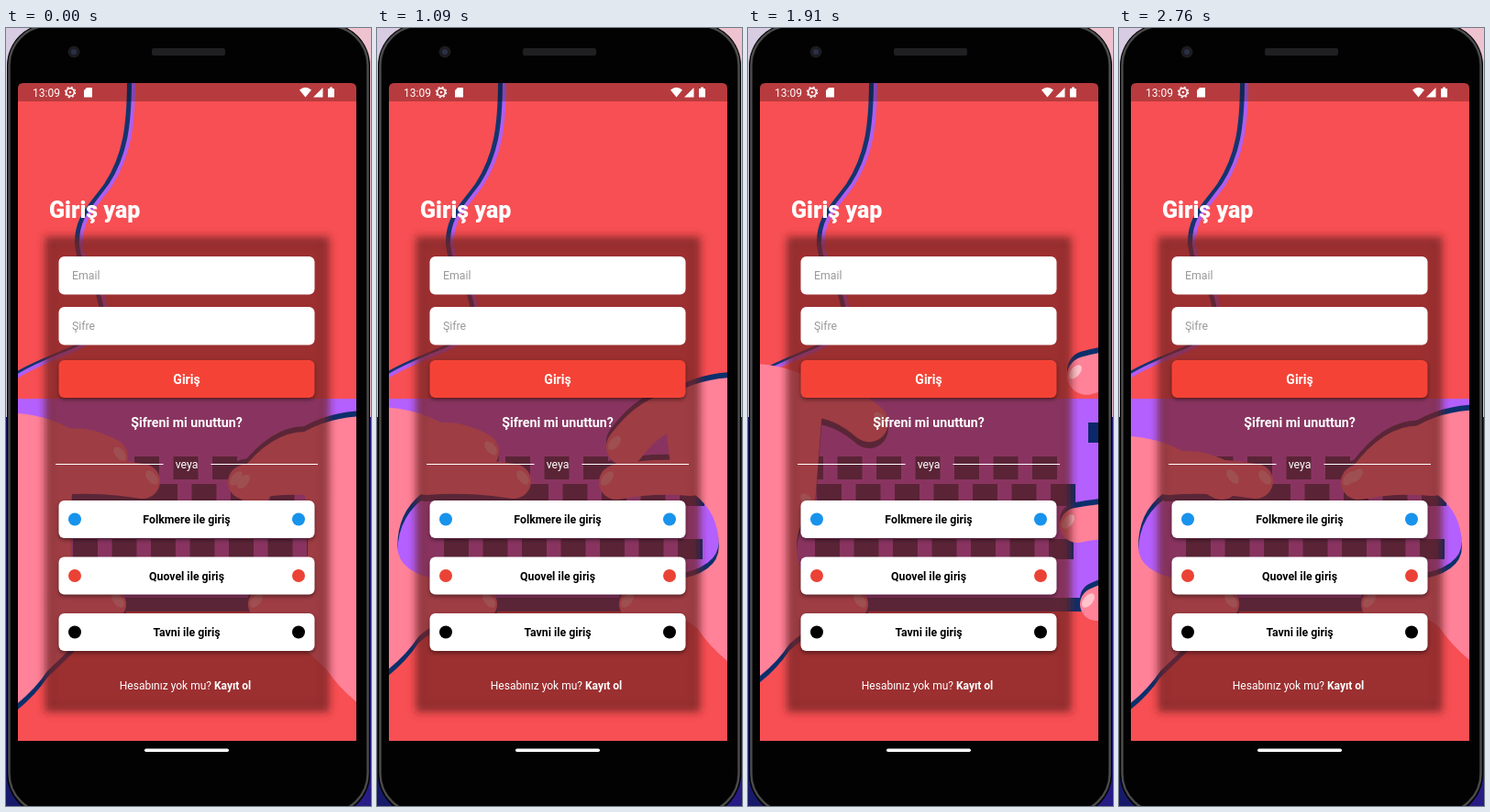
Recreate the animation shown at these times as an HTML page. Size 398x848 px, loop 2.79 s.

```html
<!DOCTYPE html>
<html lang="tr">
<head>
<meta charset="utf-8">
<title>Giriş</title>
<style>
  html, body { margin: 0; width: 100%; height: 100%; overflow: hidden; background: #000; }
  svg { display: block; width: 100%; height: 100%; }
  text { font-family: Roboto, sans-serif; font-size: 12.3px; fill: #fff; }
  .bold { font-weight: 700; }
  .mid { text-anchor: middle; }
  .hint { fill: #999; }
  .raised { filter: drop-shadow(0 2px 2px rgba(0, 0, 0, .45)); }
  .skin { color: #ff8299; }
  .shade { color: #0c2f6b; }
  .palm { fill: currentColor; }
  .finger { fill: none; stroke: currentColor; stroke-linecap: round; }
  .nail { fill: #ffc4cb; }
  .cord { fill: none; stroke-linecap: round; }
</style>
</head>
<body>
<svg viewBox="0 0 398 848">
  <defs>
    <clipPath id="screen"><path d="M13 777V66Q13 60 19 60H376Q382 60 382 66V777Z"/></clipPath>
    <filter id="soft" x="-10%" y="-10%" width="120%" height="120%"><feGaussianBlur stdDeviation="4.5"/></filter>
    <path id="cordLine" d="M137 56C137 108 132 140 112 171C94 196 79 207 80 236C82 262 102 276 106 302C108 330 92 342 74 350C54 359 30 367 8 381"/>
  </defs>

  <!-- backdrop and phone -->
  <rect width="199" height="424" fill="#d8cce2"/>
  <rect x="199" width="199" height="424" fill="#eec3cf"/>
  <rect y="424" width="199" height="424" fill="#171a68"/>
  <rect x="199" y="424" width="199" height="424" fill="#271c86"/>
  <rect x="1" y="-5" width="396" height="864" rx="46"/>
  <rect x="3.5" y="-2.5" width="391" height="858" rx="43" fill="#020202" stroke="#4a4a4a" stroke-width="2.5"/>
  <circle cx="74" cy="26" r="6.5" fill="#1b1b20"/>
  <circle cx="74" cy="26" r="3" fill="#2b3048"/>
  <rect x="159" y="22" width="80" height="8" rx="2" fill="#202022"/>
  <rect x="151" y="785.5" width="92" height="3.5" rx="1.7" fill="#fff"/>

  <g clip-path="url(#screen)">
    <rect x="13" y="60" width="369" height="717" fill="#f74f53"/>
    <use href="#cordLine" class="cord" x="-2" stroke="#14346e" stroke-width="6"/>
    <use href="#cordLine" class="cord" x="2" stroke="#b15df0" stroke-width="4"/>
    <rect x="13" y="404" width="369" height="232" fill="#0c2f6b"/>
    <rect x="13" y="404" width="369" height="217" fill="#b460ff"/>
    <g id="keys" fill="#0c2868"></g>
    <g id="hands"></g>
    <g filter="url(#soft)">
      <rect x="46" y="231" width="303" height="511" fill="none" stroke="#000" stroke-opacity=".25" stroke-width="8"/>
      <rect x="43" y="228" width="309" height="517" fill="rgb(121,36,37)" fill-opacity=".72"/>
    </g>
    <rect x="13" y="60" width="369" height="20" fill-opacity=".26"/>
  </g>

  <!-- status bar -->
  <text x="29" y="74.5" style="font-size:12px">13:09</text>
  <g fill="#fff">
    <circle cx="70" cy="70" r="4.3" fill="none" stroke="#fff" stroke-width="1.6"/>
    <circle cx="70" cy="70" r="5.6" fill="none" stroke="#fff" stroke-width="1.2" stroke-dasharray="2.2"/>
    <circle cx="70" cy="70" r="1.3"/>
    <path d="M88 65H94V75.5H85V68ZM320 67.5Q326.5 62 333 67.5L326.5 75.5ZM345.5 65V75.5H335ZM351 66H353V64.5H356V66H358V75.5H351Z"/>
  </g>

  <!-- login form -->
  <text x="47" y="207" style="font-size:25px;font-weight:900">Giriş yap</text>
  <g fill="#fff">
    <rect x="57.5" y="249" width="279" height="41.5" rx="6"/>
    <rect x="57.5" y="304" width="279" height="41.5" rx="6"/>
    <rect class="raised" x="57.5" y="362" width="279" height="41" rx="6" fill="#f44336"/>
    <path d="M54 475H171.5V476H54ZM223.5 475H340V476H223.5Z"/>
  </g>
  <text x="72" y="273.5" class="hint">Email</text>
  <text x="72" y="328.5" class="hint">Şifre</text>
  <text x="197" y="387.5" class="bold mid" style="font-size:14px">Giriş</text>
  <text x="197" y="434.5" class="bold mid" style="font-size:14.2px">Şifreni mi unuttun?</text>
  <text x="197" y="480" class="mid">veya</text>
  <g id="providers"></g>
  <text x="195.5" y="721" class="mid" style="font-size:12px">Hesabınız yok mu? <tspan class="bold">Kayıt ol</tspan></text>
</svg>
<script>
const $ = id => document.getElementById(id);

const providers = [['Folkmere', '#1893ec'], ['Quovel', '#ea4335'], ['Tavni', '#000']];
$('providers').innerHTML = providers.map(([name, color], i) => {
  const y = 515 + 61.5 * i;
  return `<rect class="raised" x="57.5" y="${y}" width="279" height="41" rx="6" fill="#fff"/>
    <circle cx="75" cy="${y + 20.5}" r="7" fill="${color}"/>
    <circle cx="319" cy="${y + 20.5}" r="7" fill="${color}"/>
    <text x="197" y="${y + 25}" class="bold mid" style="fill:#000">${name} ile giriş</text>`;
}).join('');

const key = (x, y, height) => `<rect x="${x}" y="${y}" width="27" height="${height}"/>`;
let keys = key(371, 430, 22);
for (let row = 0; row < 4; row++) {
  for (let x = 55 + (row * 20) % 42; x < 350; x += 42.5) keys += key(x, 467 + 30 * row, 25 - row);
}
$('keys').innerHTML = keys + '<rect x="130" y="590" width="140" height="21"/>';

const loop = 2.79;
const bump = (t, center, width) => Math.exp(-(((t - center) / width) ** 2));

function finger(fromX, fromY, x, y, width) {
  const endX = x - width / 2;
  const d = `M${fromX} ${fromY}Q${(fromX + endX) / 2} ${Math.min(fromY, y) - 4} ${endX} ${y}`;
  return `<path class="finger" d="${d}" stroke-width="${width}"/>`;
}
const nail = (x, y) =>
  `<ellipse class="nail" rx="9" ry="5" transform="translate(${x - 9} ${y - 4}) rotate(50)"/>`;

// x grows from the screen edge inwards; the right hand is mirrored.
function hand({ top, index, middle, gap, base, shift = 0 }, side, shadeY) {
  const thumb = [118, 628];
  const shape = `<path class="palm" d="M-25 ${top}Q30 ${top - 4} 70 ${top + 25}L60 ${middle[1]}
      Q${gap} ${middle[1] + 20} ${gap} 565Q${gap} 595 60 602L90 645
      Q55 ${base - 60} 32 ${base - 38}Q12 ${base - 8} -25 ${base + 14}H-120V${top}Z"/>`
    + finger(50, top + 38, ...index, 42)
    + finger(40, middle[1] - 4, ...middle, 38)
    + finger(50, 620, ...thumb, 36);
  return `<g transform="${side} translate(${shift})">
    <g class="shade" transform="translate(0 ${shadeY})">${shape}</g>
    <g class="skin">${shape}</g>${nail(...index)}${nail(...middle)}${nail(...thumb)}</g>`;
}

function leftHand(t) {
  const lift = bump(t, 1.9, 0.25), settle = Math.exp(-t / 0.3);
  const top = 445 - 40 * bump(t, 1.3, 0.4) - 75 * lift - 25 * settle;
  return hand({
    top,
    index: [120 + 20 * lift, top + 48 + 16 * lift],
    middle: [155 - 95 * lift, 494 + 25 * lift],
    gap: 8 + 50 * settle + 32 * lift,
    base: 718 + 21 * Math.cos(2 * Math.PI * t / loop)
  }, 'translate(13)', 7);
}

// The right hand leaves the keyboard for a moment at the height of the left hand's lift.
function rightHand(t) {
  const away = bump(t, 1.91, 0.2), settle = Math.exp(-t / 0.3);
  const top = 425 - 45 * Math.sqrt(Math.sin(Math.PI * t / loop)) - 48 * away;
  return hand({
    top,
    index: [132, top + 75 - 32 * away],
    middle: [140, 495 + 47 * away],
    gap: 8 + 45 * settle,
    base: 692 + 46 * settle,
    shift: -98 * away
  }, 'translate(382) scale(-1 1)', -6);
}

const start = performance.now();
function draw() {
  const t = (performance.now() - start) / 1000 % loop;
  $('hands').innerHTML = leftHand(t) + rightHand(t);
  requestAnimationFrame(draw);
}
draw();
</script>
</body>
</html>
```
